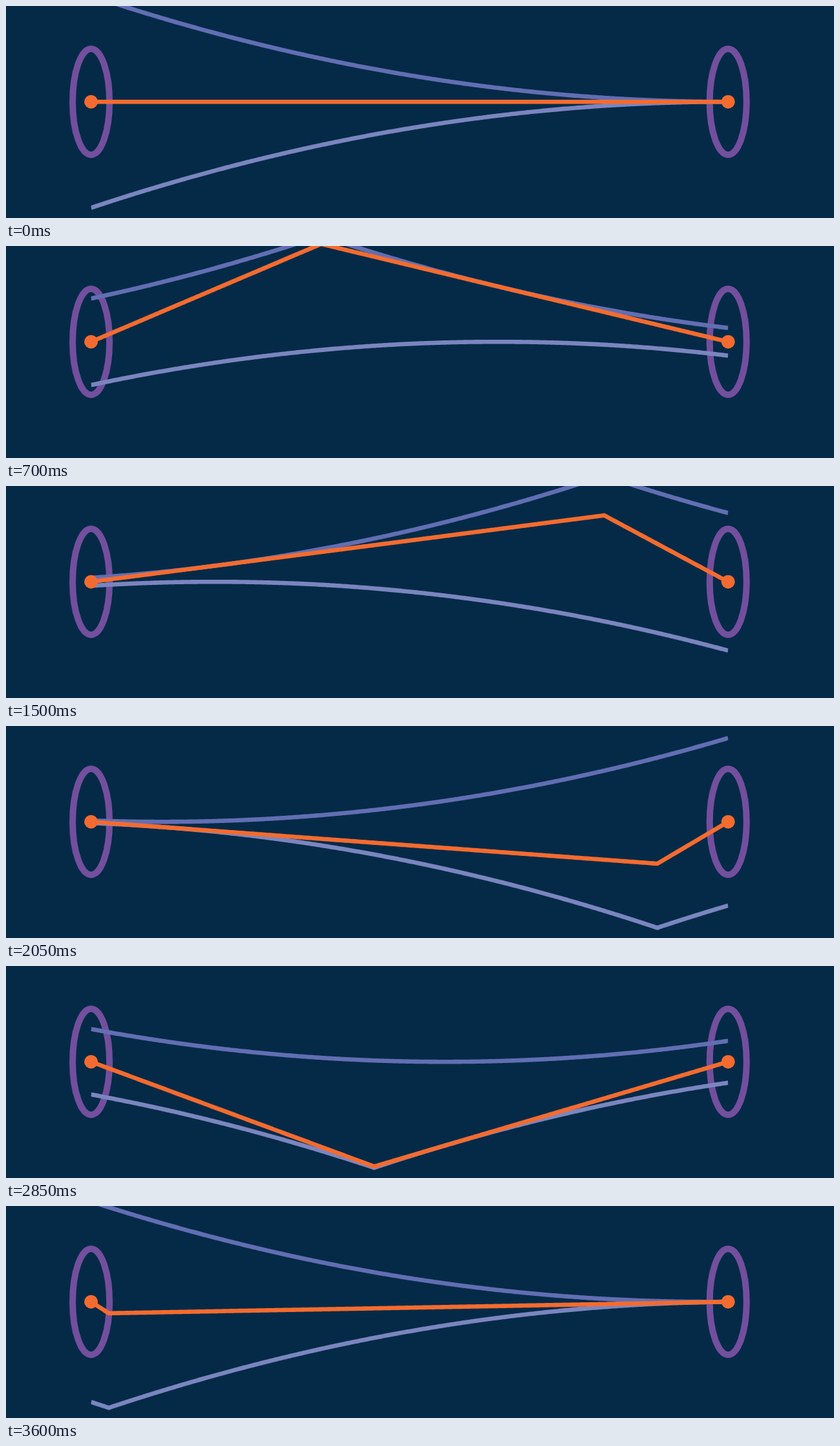
An HTML page with a canvas that plays this animation: 1280 by 328 pixels, repeating every 3650 ms.

```html
<!DOCTYPE html>
<html lang="en">
<head>
<meta charset="utf-8">
<title>Plucked string as two travelling waves</title>
<style>
html, body { margin: 0; height: 100%; overflow: hidden; background: #052a47; }
canvas { display: block; }
</style>
</head>
<body>
<canvas id="stage" width="1280" height="328"></canvas>
<script>
const ctx = document.getElementById('stage').getContext('2d');
const LEFT = 131.5, LENGTH = 984.8, MID = 148.2, HEIGHT = 164;
const LOOP = 3650, STEP = 50, STEPS = 72, SAMPLES = 360;

// Periodic parabola: cusps at even s, zero at odd s.
const wave = s => HEIGHT * (1 - ((s % 2) + 2) % 2) ** 2;

function plot(shape, color) {
  ctx.beginPath();
  for (let i = 0; i <= SAMPLES; i++) {
    const x = i / SAMPLES;
    ctx.lineTo(LEFT + x * LENGTH, MID + shape(x));
  }
  ctx.strokeStyle = color;
  ctx.lineWidth = 6.6;
  ctx.stroke();
}

function ends(rx, ry, paint) {
  for (const x of [LEFT, LEFT + LENGTH]) {
    ctx.beginPath();
    ctx.ellipse(x, MID, rx, ry, 0, 0, 2 * Math.PI);
    paint();
  }
}

function draw(now) {
  // The resting pose is held for two steps.
  const step = Math.max(0, Math.floor((now % LOOP) / STEP) - 1);
  const phase = 2 * step / STEPS;
  const right = x => -wave(x - phase);
  const left = x => wave(x + phase);

  ctx.fillStyle = '#052a47';
  ctx.fillRect(0, 0, 1280, 328);

  ctx.strokeStyle = '#734f9d';
  ctx.lineWidth = 10;
  ends(28.5, 82, () => ctx.stroke());

  ctx.save();
  ctx.beginPath();
  ctx.rect(LEFT, 0, LENGTH, 328);
  ctx.clip();
  plot(left, '#7b85bf');
  plot(right, '#626eb3');
  plot(x => left(x) + right(x), '#f46b2f');
  ctx.restore();

  ctx.fillStyle = '#f46b2f';
  ends(10.5, 10.5, () => ctx.fill());
  requestAnimationFrame(draw);
}
requestAnimationFrame(draw);
</script>
</body>
</html>
```
